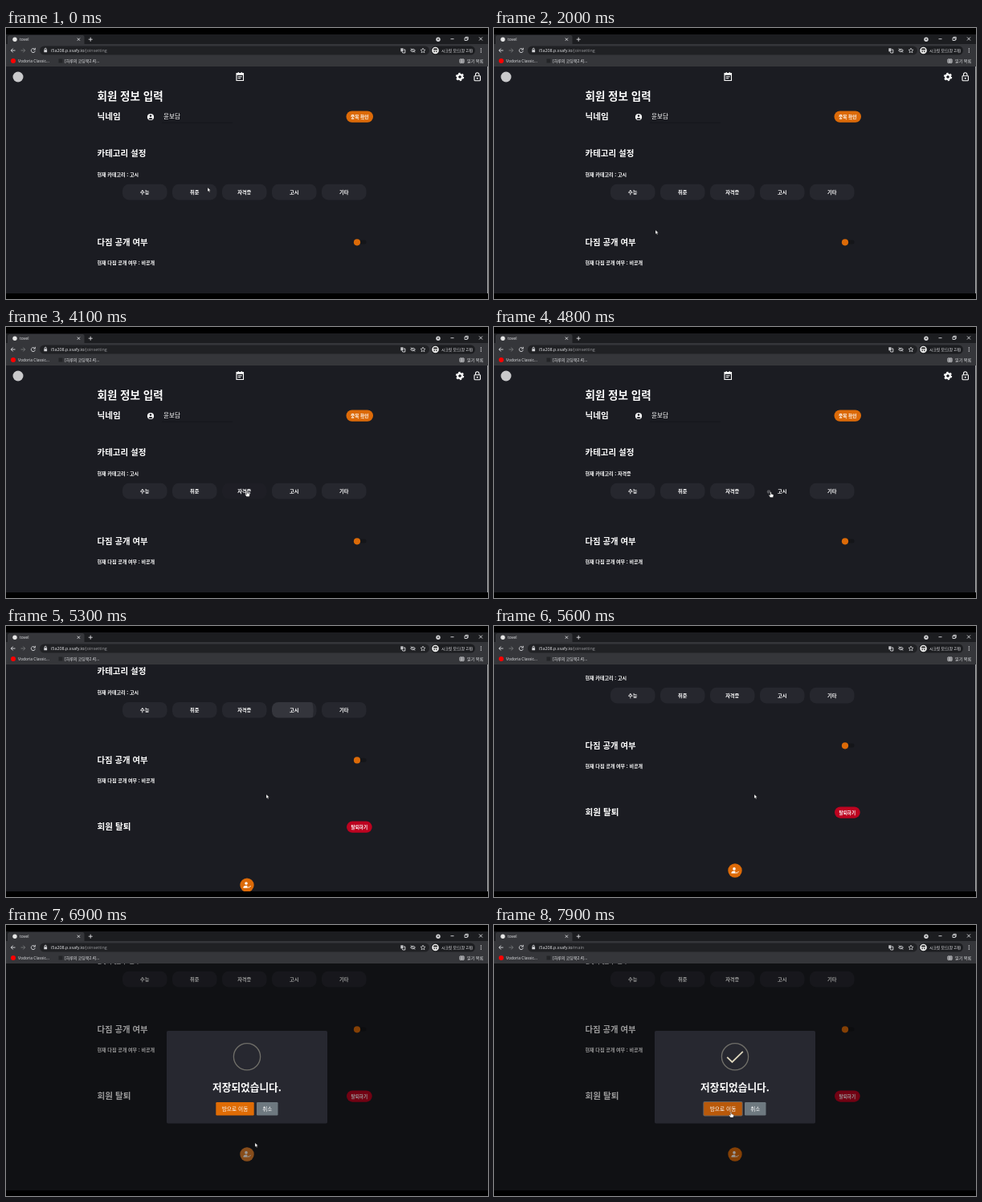
Animation of 600 by 338 pixels, one loop 8 s. Source, as an HTML page:

```html
<!DOCTYPE html>
<html lang="ko">
<head>
<meta charset="utf-8">
<title>회원 정보 입력</title>
<style>
  html, body { margin: 0; width: 100%; height: 100%; overflow: hidden; background: #000; }
  svg { display: block; width: 100%; height: 100%; }
  text { font-family: "Noto Sans CJK KR", "Noto Sans KR", "Noto Sans CJK", sans-serif; fill: #fff; white-space: pre; }
  .ui { font-family: "Open Sans", "Noto Sans CJK KR", "Noto Sans CJK", sans-serif; fill: #e4e5e8; }
  .line { fill: none; stroke: #dcdde0; stroke-width: .9; }
</style>
</head>
<body>
<svg id="stage" viewBox="0 0 600 338">
  <defs>
    <clipPath id="view"><rect y="48" width="600" height="283"/></clipPath>
    <clipPath id="round"><circle cx="300" cy="423" r="8.7"/></clipPath>
  </defs>
  <rect width="600" height="338"/>

  <g id="browser">
    <rect y="8" width="600" height="13" fill="#1c1d20"/>
    <path d="M2 20V11.500Q2 9 4.500 9H95Q97.500 9 97.500 11.500V20H600V48H0V20Z" fill="#35363a"/>
    <rect x="42" y="22.500" width="485" height="11" rx="5.500" fill="#202124"/>
    <circle cx="11" cy="14.300" r="2.700" fill="#e6e6e6"/>
    <path class="line" d="M88.800 12.600l3.200 3.200m0-3.200l-3.200 3.200M102.700 14.200h5m-2.500-2.500v5"/>
    <circle cx="538" cy="14.300" r="2.700" fill="#d5d6d9"/>
    <path d="M536.700 13.600h2.600l-1.300 1.600z" fill="#111"/>
    <path class="line" stroke-width=".7" d="M553.500 13.700h4M571 12.300h3.200v3.200h-3.200zM572 12.300v-1h3.200v3.200h-1M589 11.500l4 4m0-4l-4 4"/>
    <path class="line" d="M11.500 28H6.300m2.400-2.500L6.200 28l2.500 2.500"/>
    <path class="line" style="stroke:#75767a" d="M18.500 28h5.200m-2.400-2.500l2.500 2.500-2.500 2.500"/>
    <path class="line" d="M35.600 26.300a2.500 2.500 0 1 0 .7 2.300M36.300 24.800v2.200h-2.200"/>
    <rect x="47.300" y="27.300" width="3.800" height="3" rx=".4" fill="#d5d6d9"/>
    <path class="line" stroke-width=".7" d="M48.100 27.300v-1a1.100 1.100 0 0 1 2.200 0v1"/>
    <rect x="491.300" y="25.300" width="3.200" height="4" fill="#c8c9cc"/>
    <path class="line" d="M495 27h1.800v4h-3l-.8-1.500"/>
    <path class="line" d="M503.600 28q2.900-3.400 5.800 0q-2.900 3.400-5.800 0zM504 25.500l5 5"/>
    <path class="line" style="stroke-width:.7" d="M519 25.100l.9 2 2.100.2-1.600 1.400.5 2.100-1.900-1.100-1.900 1.100.5-2.100-1.600-1.400 2.100-.2z"/>
    <rect x="529" y="22.500" width="55" height="11" rx="5.500" fill="#1c1d20"/>
    <circle cx="534.500" cy="28" r="4.300" fill="#f1f1f1"/>
    <path d="M531.700 27.600h5.600l-1-2.300h-3.600z" fill="#333"/>
    <circle cx="533.200" cy="29.300" r=".9" fill="#333"/><circle cx="535.800" cy="29.300" r=".9" fill="#333"/>
    <path d="M591.300 25.200v1.200m0 1v1.200m0 1v1.200" stroke="#dcdde0" stroke-width="1.200"/>
    <circle cx="9" cy="41" r="3" fill="#f00"/>
    <rect x="65.500" y="38.500" width="5" height="5" fill="#232427"/>
    <path class="line" d="M565 39h5v4.300h-5zM567.500 39v4.300M565 41.200h5"/>
  </g>

  <g clip-path="url(#view)">
    <rect y="48" width="600" height="283" fill="#1b1c22"/>
    <g id="page">
      <circle cx="15" cy="61" r="6.500" fill="#c9c9cb"/>
      <path d="M287 56.500h8.500v9H287z" fill="none" stroke="#fff" stroke-width="1.100"/>
      <path d="M287 56h8.500v2.700H287zM288.700 55h1.100v2h-1.100zM292.700 55h1.100v2h-1.100zM288.700 60.300h5v1h-5zM288.700 62.300h3.500v1h-3.500z" fill="#fff"/>
      <circle cx="565" cy="61" r="2.900" fill="none" stroke="#fff" stroke-width="2.200"/>
      <circle cx="565" cy="61" r="4.500" fill="none" stroke="#fff" stroke-width="1.400" stroke-dasharray="2.356 2.356"/>
      <rect x="583" y="59.700" width="7.400" height="6" rx=".6" fill="none" stroke="#fff" stroke-width="1.100"/>
      <path d="M584.500 59.500v-1.600a2.200 2.200 0 0 1 4.400 0v1.600" fill="none" stroke="#fff" stroke-width="1.100"/>
      <circle cx="586.700" cy="62.700" r="1" fill="#fff"/>
      <circle cx="180" cy="111" r="4.100" fill="#fff"/>
      <circle cx="180" cy="109.600" r="1.300" fill="#1b1c22"/>
      <path d="M177.400 112.900q2.600-1.900 5.200 0q-2.600 2.900-5.200 0z" fill="#1b1c22"/>
      <path d="M194 118.200h88" stroke="#121318" stroke-width=".7"/>
      <rect x="423.500" y="103.500" width="33.500" height="14.300" rx="7.100" fill="#dc6a08"/>
      <rect x="434" y="264.600" width="14.500" height="5" rx="2.500" fill="#141519"/>
      <circle cx="437" cy="267.300" r="4.100" fill="#dc6a08"/>
      <rect x="424" y="343.500" width="31.700" height="14.200" rx="7.100" fill="#bd0320"/>
    </g>
    <rect id="scrollbar" x="599" y="48" width="1" height="283" fill="#a3a3a5"/>
    <rect id="shade" y="48" width="600" height="283"/>
    <g id="dialog">
      <rect x="200" y="132" width="200" height="115.500" rx="1.800" fill="#272830"/>
      <circle cx="300" cy="164.300" r="16.600" fill="none" stroke="#706f69" stroke-width="1.300"/>
      <path id="check" d="M290.200 164.800l6.300 6.200 13.300-13.200" pathLength="1" stroke-dasharray="1 2" fill="none" stroke="#ded7bd" stroke-width="1.800"/>
      <rect id="ring" x="260.300" y="220.100" width="49.400" height="18.300" rx="1.800" fill="#68625f"/>
      <rect id="go" x="261.300" y="221.100" width="47.400" height="16.300" rx="1.200"/>
      <rect x="312" y="221.100" width="26.500" height="16.300" rx="1.200" fill="#6e7980"/>
    </g>
  </g>
  <g id="mouse">
    <path id="arrow" d="M0 0v5l1.200-1 .8 1.800.9-.4-.8-1.800h1.600z" fill="#fff" stroke="#111" stroke-width=".3"/>
    <path id="hand" d="M-.6 0Q0-.7.600 0V2.300L3 2.900Q3.600 3.200 3.400 4.200L2.800 6.500H-.6L-2.400 3.900Q-2.100 3-1.300 3.500L-.6 4.100Z" fill="#fff" stroke="#111" stroke-width=".3"/>
  </g>
</svg>
<script>
const LOOP = 8000;
const $ = id => document.getElementById(id);

function add(parent, tag, attrs) {
  const el = document.createElementNS("http://www.w3.org/2000/svg", tag);
  set(el, attrs);
  return parent.appendChild(el);
}
function set(el, attrs) {
  for (const k in attrs) el.setAttribute(k, attrs[k]);
}
// y is the visual middle of the line
function label(parent, x, y, size, str, attrs) {
  const el = add(parent, "text", { x, y: y + size * .37, "font-size": size, ...attrs });
  el.textContent = str;
  return el;
}
const bold = { "font-weight": 700 };
const mid = { "text-anchor": "middle" };
const boldMid = { ...bold, ...mid };
const ui = { class: "ui" };

// Browser labels
const bar = $("browser"), page = $("page"), dialog = $("dialog");
label(bar, 17, 14.2, 5.1, "tovel", ui);
const url = label(bar, 56, 28, 5.4, "i5a208.p.ssafy.io", ui);
const path = add(url, "tspan", { fill: "#97989c" });
label(bar, 15, 41, 5, "Vodoria Classic...", ui);
label(bar, 73, 41, 5, "[하루의 코딩북2.4]...", ui);
label(bar, 542, 28, 4.8, "시크릿 모드(창 2개)", ui);
label(bar, 574, 41, 5.1, "읽기 목록", ui);

// Page labels
[[85, 13.5, "회원 정보 입력"], [110.5, 10.6, "닉네임"], [156.5, 10.5, "카테고리 설정"],
 [267, 10.4, "다짐 공개 여부"], [293, 6.05, "현재 다짐 공개 여부 : 비공개"], [350, 10.6, "회원 탈퇴"]]
  .forEach(([y, size, str]) => label(page, 113.5, y, size, str, bold));
const current = label(page, 113.5, 182.3, 6.05, "", bold);
label(page, 196, 110.5, 7.6, "윤보담");
label(page, 440.2, 110.7, 5.7, "중복 확인", boldMid);
label(page, 439.8, 350.5, 5.6, "탈퇴하기", boldMid);
label(dialog, 300, 202.3, 12.7, "저장되었습니다.", boldMid);
label(dialog, 285, 229.3, 6.7, "방으로 이동", mid);
label(dialog, 325.2, 229.3, 6.5, "취소", mid);

// Category buttons; hover fades the fill away
const defs = document.querySelector("defs");
const buttons = ["수능", "취준", "자격증", "고시", "기타"].map((name, i) => {
  const x = 145 + i * 62;
  const box = { x, y: 194.8, width: 55.5, height: 19.6, rx: 8 };
  add(add(defs, "clipPath", { id: "cat" + i }), "rect", box);
  const fill = add(page, "rect", { ...box, fill: "#26272e" });
  const ripple = add(page, "circle", { cy: 205.5, fill: "#fff", "clip-path": `url(#cat${i})` });
  label(page, x + 27.7, 204.7, 6.2, name, boldMid);
  return { fill, ripple };
});

// Save button
const save = {
  fill: add(page, "circle", { cx: 300, cy: 423, r: 8.7, fill: "#dc6a08" }),
  ripple: add(page, "circle", { cx: 300, cy: 423, fill: "#fff", "clip-path": "url(#round)" })
};
add(page, "circle", { cx: 299, cy: 420.9, r: 1.8, fill: "#fff" });
add(page, "path", { d: "M295.400 426.600v-1.100q.6-1.900 3.600-1.900 1 0 1.800.3l-1 1.100 1.600 1.600z", fill: "#fff" });
add(page, "path", { d: "M300.800 425l1.400 1.400 2.400-2.500", fill: "none", stroke: "#fff", "stroke-width": 1 });

// Motion tables: time first, then values
const OPEN = 6565;
const moves = [
  [0, 251, 199], [500, 251, 199], [1000, 236, 214], [1200, 236, 214], [1600, 201, 262],
  [1800, 201, 262], [2000, 201, 252], [2150, 201, 252], [2600, 415, 204], [2700, 415, 204],
  [3050, 374, 203], [3300, 374, 203], [3400, 371, 204], [3700, 371, 204], [4000, 300, 205],
  [4200, 300, 205], [4500, 344.5, 206], [4900, 344.5, 206], [5300, 324, 210], [5650, 324, 210],
  [6200, 299.5, 286], [6650, 299.5, 286], [7300, 331, 243], [7400, 331, 243], [7750, 295, 233.5]];
const scrolls = [[5000, 0], [5400, 118], [5650, 118], [5950, 137]];
const pops = [[OPEN, .7], [OPEN + 135, 1.05], [OPEN + 240, .95], [OPEN + 300, 1]];
const hovers = [
  [buttons[4], 2560, 2830], [buttons[3], 2990, 3800], [buttons[2], 3920, 4340],
  [buttons[3], 4400, 5000], [save, 6050, 6600]];
const clicks = [[buttons[2], 4050, 300, 32], [buttons[3], 4720, 342, 36], [save, 6470, 300, 13]];

const clamp = v => Math.min(1, Math.max(0, v));
const ramp = (t, from, ms) => clamp((t - from) / ms);
const smooth = k => k * k * (3 - 2 * k);
const out = k => 1 - (1 - k) ** 1.8;

function at(table, t, ease) {
  if (t <= table[0][0]) return table[0].slice(1);
  const i = table.findIndex(row => row[0] > t);
  if (i < 0) return table[table.length - 1].slice(1);
  const a = table[i - 1], b = table[i];
  const k = ease((t - a[0]) / (b[0] - a[0]));
  return a.slice(1).map((v, n) => v + (b[n + 1] - v) * k);
}

function draw(t) {
  set(page, { transform: `translate(0 ${-at(scrolls, t, smooth)[0]})` });
  const word = t >= 4150 && t < 4880 ? "자격증" : "고시";
  current.textContent = "현재 카테고리 : " + word;
  path.textContent = t >= 7850 ? "/main" : "/joinsetting";

  for (const b of [...buttons, save]) {
    let gone = 0;
    for (const [who, from, to] of hovers)
      if (who === b) gone += ramp(t, from, 250) - ramp(t, to, 250);
    set(b.fill, { opacity: 1 - clamp(gone) });
    set(b.ripple, { opacity: 0 });
  }
  for (const [b, from, x, size] of clicks) {
    if (t < from || t > from + 700) continue;
    const k = ramp(t, from, 550);
    set(b.ripple, { cx: x, r: 1 + size * k * (b === save ? 2 - k : k + .1), opacity: .25 * (1 - ramp(t, from + 250, 450)) });
  }

  // The open dialog locks scrolling, so the bar goes away
  const open = t >= OPEN, scale = at(pops, t, out)[0];
  set($("scrollbar"), { opacity: open ? 0 : 1 });
  set($("shade"), { opacity: .4 * ramp(t, OPEN + 15, 100) });
  set(dialog, {
    visibility: open ? "visible" : "hidden",
    transform: `translate(300 189.700) scale(${scale}) translate(-300 -189.700)`
  });
  const drawn = smooth(ramp(t, OPEN + 405, 345));
  set($("check"), { "stroke-dashoffset": 1 - drawn, opacity: drawn > 0 ? 1 : 0 });
  const over = t >= 7600;
  set($("go"), { fill: over ? "#b9590a" : "#df6c05" });
  set($("ring"), { opacity: over ? 1 : 0 });

  const [x, y] = at(moves, t, smooth);
  const hand = over || hovers.some(([, from, to]) => t >= from && t < to);
  set($("mouse"), { transform: `translate(${x} ${y})` });
  set($("hand"), { opacity: hand ? 1 : 0 });
  set($("arrow"), { opacity: hand ? 0 : 1 });
}

const start = performance.now();
function tick() {
  draw((performance.now() - start) % LOOP);
  requestAnimationFrame(tick);
}
tick();
</script>
</body>
</html>
```
